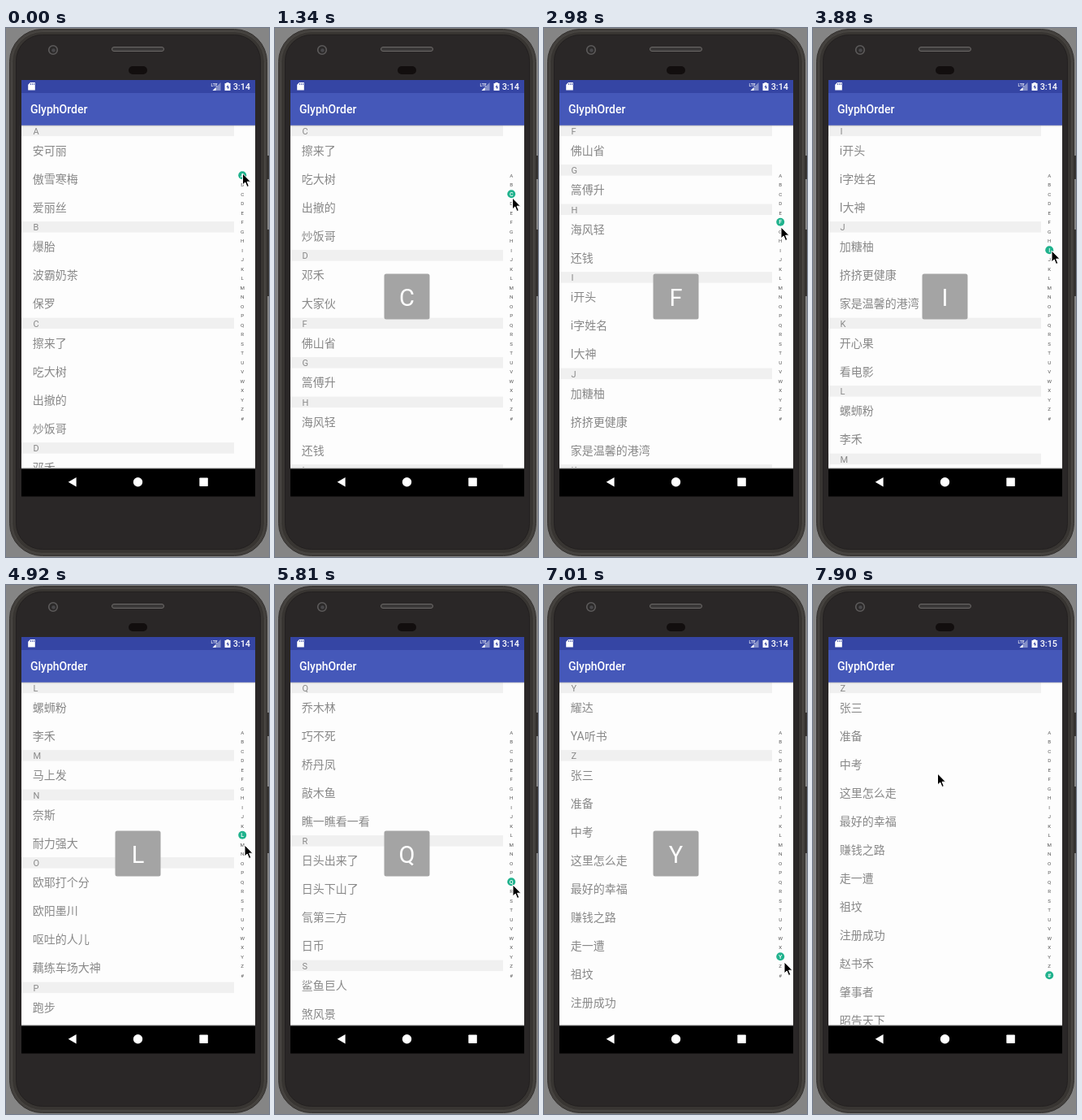
Animation of 324x651 px, one loop 8000 ms. Source, as an HTML page:

```html
<!DOCTYPE html>
<html lang="zh-CN">
<head>
<meta charset="utf-8">
<style>
html, body { margin: 0; width: 100%; height: 100%; overflow: hidden; background: #858585; }
svg { display: block; }
text { font-family: Roboto, "Noto Sans CJK SC", sans-serif; }
.item { font-size: 14px; fill: #888; }
.head { font-size: 11px; fill: #888; }
.index { font-size: 6.2px; fill: #555; text-anchor: middle; }
.bar { font-weight: 500; fill: #fff; }
#picked { font-size: 7px; font-weight: 500; fill: #fff; }
</style>
</head>
<body>
<svg width="324" height="651" viewBox="0 0 324 651">
  <defs>
    <linearGradient id="shade" x2="0" y2="1">
      <stop stop-color="#000" stop-opacity=".2"/>
      <stop offset="1" stop-color="#000" stop-opacity="0"/>
    </linearGradient>
  </defs>

  <!-- phone body -->
  <path d="M320 157h4v29h-4zM320 248h4v82h-4z" fill="#353331"/>
  <rect x="4.5" y="1.5" width="317" height="648" rx="40" fill="#43403d" stroke="#33302e"/>
  <rect x="7.5" y="4.5" width="311" height="642" rx="37" fill="#383532" stroke="#4b4844"/>
  <rect x="12.5" y="8.5" width="301" height="633" rx="32" fill="#2a2727" stroke="#232020"/>
  <circle cx="58" cy="27" r="5.3" fill="#2b2929" stroke="#5d5b5b" stroke-width="1.6"/>
  <circle cx="58.5" cy="27.5" r="2.3" fill="#49484b"/>
  <rect x="130.5" y="23.5" width="64" height="5" rx="2.5" fill="#3a3838" stroke="#6c6968"/>
  <rect x="151" y="47" width="23" height="10" rx="5" fill="#120e0e"/>

  <!-- screen -->
  <rect x="19" y="64" width="288" height="512" fill="#fdfdfd"/>
  <svg x="19" y="119.6" width="288" height="422.4"><g id="list"></g></svg>
  <rect x="19" y="64" width="288" height="16" fill="#3545a4"/>
  <rect x="19" y="80" width="288" height="39.8" fill="#4558b9"/>
  <rect x="19" y="119.8" width="288" height="2" fill="url(#shade)"/>
  <text class="bar" x="30" y="105" font-size="14">GlyphOrder</text>
  <text class="bar" id="clock" x="301" y="76" font-size="10.8" text-anchor="end"></text>
  <path d="M30 67h5.800v9.500h-8.600v-6.700z" fill="#fff"/>
  <path d="M30.500 68v2M32.500 68v2M34.500 68v2" stroke="#3545a4" stroke-width=".8"/>
  <path d="M264.500 67v10h-10z" fill="#8590c8"/>
  <path d="M258.500 73v4h-4z" fill="#fff"/>
  <text class="bar" x="252.500" y="71.500" font-size="5">LTE</text>
  <path d="M271.500 67h3v1h2v9h-7v-9h2z" fill="#fff"/>
  <path d="M273.500 69.500l-2 3.500h1.500v2.800l2-3.600h-1.500z" fill="#3545a4"/>
  <rect x="19" y="541" width="288" height="1.500" fill="#c4c4c4"/>
  <rect x="19" y="542.300" width="288" height="34.200"/>
  <path d="M76.700 558.700l9.900-5.700v11.400z" fill="#fff"/>
  <circle cx="162.500" cy="558.700" r="5.700" fill="#fff"/>
  <rect x="238.300" y="553.500" width="10.500" height="10.500" rx=".8" fill="#fff"/>

  <!-- letter index, popup and pointer -->
  <g id="index"></g>
  <circle id="dot" cx="291.200" r="5" fill="#20b28d"/>
  <text class="index" id="picked" x="291.200"></text>
  <g id="popup">
    <rect x="134.500" y="302.500" width="56" height="56" rx="2.500" fill="#a4a4a4"/>
    <text id="big" x="162.500" y="342" font-size="29" fill="#fff" text-anchor="middle"></text>
  </g>
  <path id="pointer" d="M0 0V14L3.200 11 5.500 16.500 7.800 15.500 5.600 10.200H10Z" stroke="#fff" stroke-width="1"/>
</svg>
<script>
const LETTERS = 'ABCDEFGHIJKLMNOPQRSTUVWXYZ#';
const HEAD = 13.5, ROW = 35, STEP = 149, LOOP = 8000;
const GROUPS = {
  A: '安可丽 傲雪寒梅 爱丽丝',
  B: '爆胎 波霸奶茶 保罗',
  C: '擦来了 吃大树 出撤的 炒饭哥',
  D: '邓禾 大家伙',
  F: '佛山省',
  G: '篙傅升',
  H: '海风轻 还钱',
  I: 'i开头 i字姓名 I大神',
  J: '加糖柚 挤挤更健康 家是温馨的港湾',
  K: '开心果 看电影',
  L: '螺蛳粉 李禾',
  M: '马上发',
  N: '奈斯 耐力强大',
  O: '欧耶打个分 欧阳墨川 呕吐的人儿 藕练车场大神',
  P: '跑步 排队买票',
  Q: '乔木林 巧不死 桥丹凤 敲木鱼 瞧一瞧看一看',
  R: '日头出来了 日头下山了 氜第三方 日币',
  S: '鲨鱼巨人 煞风景 山里人家',
  T: '太阳花 跳跳糖',
  W: '网球拍 晚安',
  X: '西瓜汁 下雨了',
  Y: '耀达 YA听书',
  Z: '张三 准备 中考 这里怎么走 最好的幸福 赚钱之路 走一遭 祖坟 注册成功 赵书禾 肇事者 昭告天下 正好'
};
// letter under the finger at each step
const PICKS = 'AAAAABBCCCCDDDDDEEFFFGGGHHIIJJKKLLMNOPPQRSTUVWXYYZ####';
// pointer tip: step, x, y
const PATH = [
  [0, 291.500, 179], [1, 291.500, 182], [4, 291.500, 182], [9, 292.500, 209],
  [11, 292, 214], [13, 292, 214], [14, 292, 221], [15, 292, 221],
  [20, 292, 245], [23, 292, 257], [24, 292, 263], [25, 292, 263],
  [26, 294, 274], [27, 294, 274], [33, 294, 320], [39, 293, 369],
  [47, 296, 464], [50, 290, 483], [53, 153.500, 232]
];

const $ = id => document.getElementById(id);

function add(parent, tag, attrs, text = '') {
  const el = document.createElementNS('http://www.w3.org/2000/svg', tag);
  for (const key in attrs) el.setAttribute(key, attrs[key]);
  el.textContent = text;
  parent.append(el);
}

const tops = {};
let y = 0;
for (const letter of LETTERS) {
  const names = GROUPS[letter];
  if (!names) continue;
  tops[letter] = y;
  add($('list'), 'rect', { y, width: 262, height: HEAD, fill: '#f0f0f0' });
  add($('list'), 'text', { class: 'head', x: 14.500, y: y + 11.200 }, letter);
  y += HEAD;
  for (const name of names.split(' ')) {
    add($('list'), 'text', { class: 'item', x: 13.800, y: y + 22.600 }, name);
    y += ROW;
  }
}

const indexY = letter => 181.300 + LETTERS.indexOf(letter) * 11.500;
for (const letter of LETTERS)
  add($('index'), 'text', { class: 'index', x: 291.200, y: indexY(letter) + 2.200 }, letter);

// a letter without a group keeps the nearest group before it
function scrollFor(letter) {
  let i = LETTERS.indexOf(letter);
  while (!(LETTERS[i] in tops)) i--;
  return tops[LETTERS[i]];
}

function tipAt(step) {
  const k = Math.max(1, PATH.findIndex(p => p[0] >= step));
  const [s0, x0, y0] = PATH[k - 1], [s1, x1, y1] = PATH[k];
  const f = (step - s0) / (s1 - s0);
  return [x0 + (x1 - x0) * f, y0 + (y1 - y0) * f];
}

function draw(now) {
  const step = Math.min(53, Math.floor(now % LOOP / STEP));
  const letter = PICKS[step], cy = indexY(letter);
  $('list').setAttribute('transform', `translate(0 ${-scrollFor(letter)})`);
  $('dot').setAttribute('cy', cy);
  $('picked').setAttribute('y', cy + 2.500);
  $('picked').textContent = $('big').textContent = letter;
  $('popup').style.display = step >= 3 && step < 52 ? '' : 'none';
  $('clock').textContent = step < 49 ? '3:14' : '3:15';
  $('pointer').setAttribute('transform', `translate(${tipAt(step)})`);
  requestAnimationFrame(draw);
}
draw(performance.now());
</script>
</body>
</html>
```
